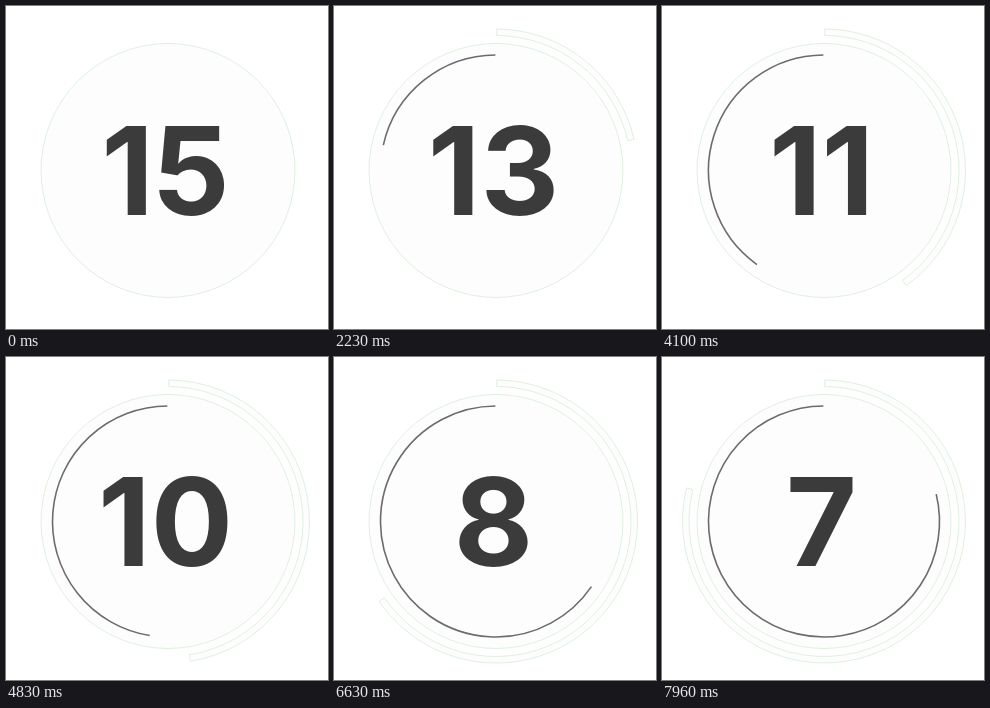
An HTML page for the animation above (8000 ms loop, 322 by 323 pixels).

```html
<!DOCTYPE html>
<html lang="en">
<head>
<meta charset="utf-8">
<title>Countdown</title>
<style>
  html, body { margin: 0; width: 100%; height: 100%; overflow: hidden; background: #fff; }
  svg { display: block; width: 100%; height: 100%; }
  .edge { fill: #fdfdfd; stroke: #dcefdc; stroke-width: .9; }
  #sweep { fill: none; stroke: #6c6c6c; stroke-width: 1.6; }
  #count { font: 700 122px Inter, "Liberation Sans", sans-serif; fill: #3b3b3b; text-anchor: middle; }
</style>
</head>
<body>
<svg viewBox="0 0 322 323">
  <path id="band" class="edge"/>
  <circle class="edge" cx="162" cy="164.5" r="127"/>
  <path id="sweep"/>
  <text id="count" x="159.5" y="208.5">15</text>
</svg>
<script>
  const LOOP = 8000, HOLD = 100, STEP = 1000 / 15, DEGREES_PER_STEP = 2.4;
  const CENTER = { x: 162, y: 164.5 };
  const [band, sweep, count] = ["band", "sweep", "count"].map(id => document.getElementById(id));

  // Angles are measured clockwise from twelve o'clock.
  function point(radius, degrees) {
    const a = degrees * Math.PI / 180;
    return `${CENTER.x + radius * Math.sin(a)} ${CENTER.y - radius * Math.cos(a)}`;
  }

  function arcTo(radius, degrees, span, clockwise) {
    return `A${radius} ${radius} 0 ${span > 180 ? 1 : 0} ${clockwise ? 1 : 0} ${point(radius, degrees)}`;
  }

  function draw(time) {
    const step = Math.floor((time - HOLD) / STEP + 0.1);
    count.textContent = Math.round(15 - Math.max(step, 0) / 15);
    if (step < 0) {
      band.setAttribute("d", "");
      sweep.setAttribute("d", "");
      return;
    }
    const angle = step * DEGREES_PER_STEP + 0.5;
    band.setAttribute("d",
      `M${point(141.5, 0.3)}${arcTo(141.5, angle, angle, true)}` +
      `L${point(135, angle)}${arcTo(135, 0.3, angle, false)}Z`);
    sweep.setAttribute("d", `M${point(115.5, -0.3)}${arcTo(115.5, -angle, angle, false)}`);
  }

  const start = performance.now();
  function tick() {
    draw((performance.now() - start) % LOOP);
    requestAnimationFrame(tick);
  }
  tick();
</script>
</body>
</html>
```
